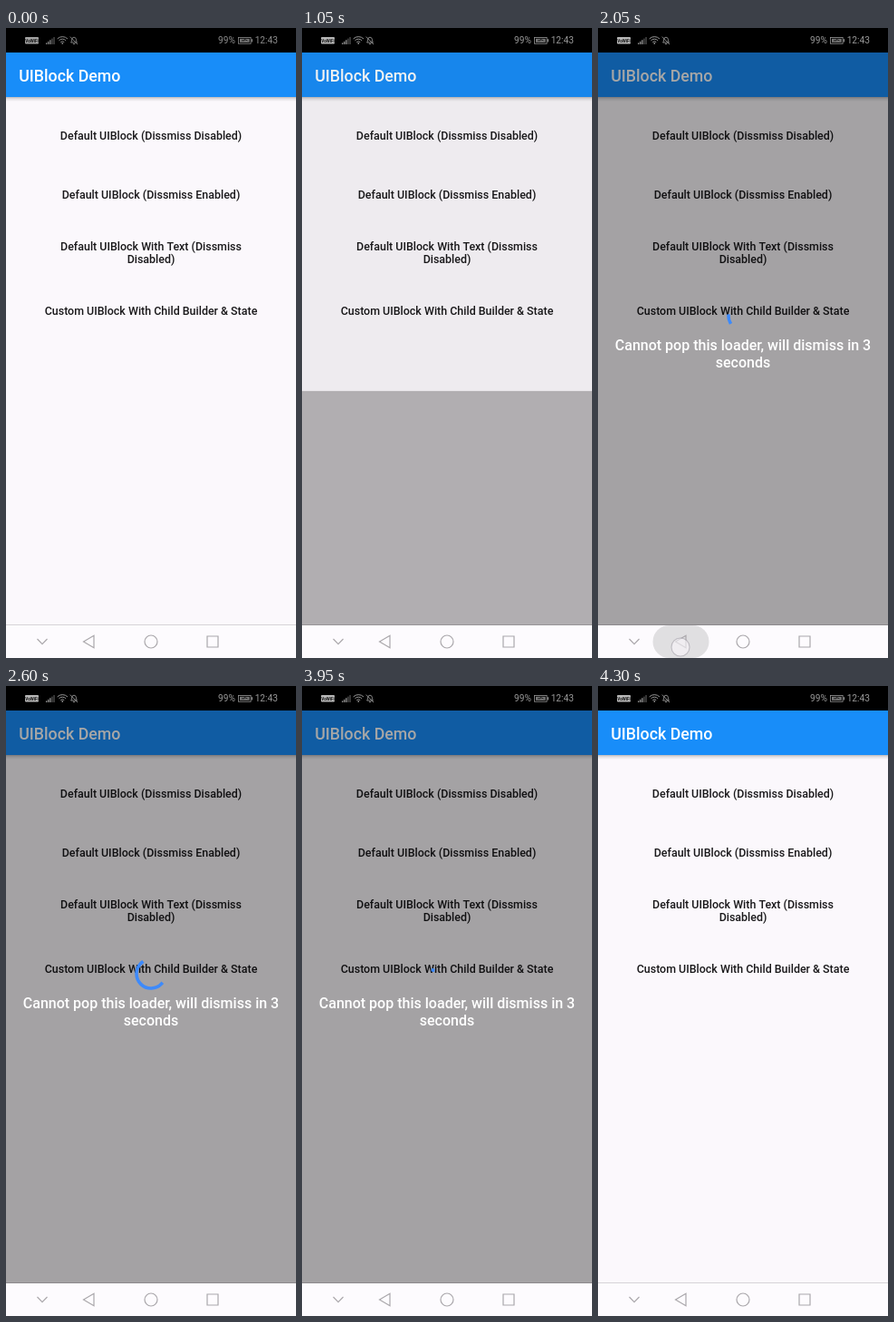
Recreate the animation shown at these times as an HTML page with a canvas. Size 320x694 px, loop 4.8 s.

```html
<!DOCTYPE html>
<html lang="en">
<head>
<meta charset="utf-8">
<title>UIBlock Demo</title>
<style>
  html, body { margin: 0; width: 100%; height: 100%; overflow: hidden; background: #fbf8fc; }
  canvas { display: block; width: 320px; height: 694px; }
</style>
</head>
<body>
<canvas id="stage"></canvas>
<script>
const W = 320, H = 694, LOOP = 4800, STEP = 50;
const TOP = 27, BAR = 76, NAV = 658;
const FONT = 'Roboto, "Noto Sans", sans-serif';
const canvas = document.getElementById('stage');
const g = canvas.getContext('2d');
const dpr = window.devicePixelRatio || 1;
canvas.width = W * dpr;
canvas.height = H * dpr;

const clamp = v => Math.max(0, Math.min(1, v));
const ramp = (t, from, to) => clamp((t - from) / (to - from));

function rect(x, y, w, h, color) {
  g.fillStyle = color;
  g.fillRect(x, y, w, h);
}

function text(str, x, y, size, color, align = 'center', weight = 500) {
  g.font = `${weight} ${size}px ${FONT}`;
  g.textAlign = align;
  g.fillStyle = color;
  g.fillText(str, x, y);
}

function line(points, color, width, closed) {
  g.beginPath();
  points.forEach(([x, y]) => g.lineTo(x, y));
  if (closed) g.closePath();
  g.strokeStyle = color;
  g.lineWidth = width;
  g.stroke();
}

function arc(x, y, r, from, to, color, width) {
  g.beginPath();
  g.arc(x, y, r, from, to);
  g.strokeStyle = color;
  g.lineWidth = width;
  g.stroke();
}

// Material standard curve: cubic-bezier(.4, 0, .2, 1)
function fastOutSlowIn(x) {
  let lo = 0, hi = 1;
  for (let i = 0; i < 24; i++) {
    const s = (lo + hi) / 2, q = 1 - s;
    if (1.2 * q * q * s + 0.6 * q * s * s + s * s * s < x) lo = s; else hi = s;
  }
  return lo * lo * (3 - 2 * lo);
}

function statusBar(t) {
  rect(0, 0, W, TOP, '#000');
  const ink = t < STEP ? '#8c8c8c' : '#989898';
  g.fillStyle = t < STEP ? '#a4a4a4' : '#b8b8b8';
  g.beginPath();
  g.roundRect(21, 10, 15, 7.5, 1);
  g.fill();
  text('VoWiFi', 28.5, 15.8, 4.6, '#111', 'center', 700);

  for (let i = 0; i < 5; i++) {
    rect(44 + i * 2.1, 16.4 - i * 1.6, 1.3, 1.6 + i * 1.6, i < 3 ? ink : '#505050');
  }
  [2.8, 5.4, 8].forEach(r => arc(62.3, 17.6, r, -Math.PI * 0.75, -Math.PI * 0.25, ink, 1));
  g.beginPath();
  g.arc(62.3, 16.9, 0.9, 0, 7);
  g.fillStyle = ink;
  g.fill();

  line([[71.5, 16], [72.6, 14.8], [72.6, 12.4], [73.4, 10.8], [75, 10.2],
        [76.6, 10.8], [77.4, 12.4], [77.4, 14.8], [78.5, 16]], ink, 0.9, true);
  line([[74, 17.6], [76, 17.6]], ink, 0.9);
  line([[70.8, 9.6], [79, 18]], ink, 0.9);

  text('99%', 234, 17.4, 10.2, ink, 'left', 400);
  text('12:43', 300, 17.4, 10.2, ink, 'right', 400);
  g.strokeStyle = ink;
  g.lineWidth = 0.8;
  g.strokeRect(256.5, 10.4, 13.6, 6.8);
  rect(258, 11.8, 10.6, 4, '#777');
  rect(270.8, 12.2, 1.2, 3.2, ink);
  line([[260, 13.8], [263, 13.8], [263, 12.6], [266.5, 13.8]], '#111', 0.9);
}

function page() {
  rect(0, TOP, W, NAV - TOP, '#fbf8fc');
  const shade = g.createLinearGradient(0, BAR, 0, BAR + 5);
  shade.addColorStop(0, 'rgba(0,0,0,.26)');
  shade.addColorStop(0.4, 'rgba(0,0,0,.1)');
  shade.addColorStop(1, 'rgba(0,0,0,0)');
  rect(0, BAR, W, 5, shade);
  rect(0, TOP, W, BAR - TOP, '#188df9');
  text('UIBlock Demo', 14.2, 58.7, 17.78, '#fff', 'left');

  const label = (str, y) => text(str, 160, y, 12.44, '#19181a');
  label('Default UIBlock (Dissmiss Disabled)', 123.4);
  label('Default UIBlock (Dissmiss Enabled)', 187.6);
  label('Default UIBlock With Text (Dissmiss', 244.5);
  label('Disabled)', 258.8);
  label('Custom UIBlock With Child Builder & State', 315.8);
  rect(0, NAV - 1, W, 1, '#d6d3d7');
}

function spinner(x, y, ms) {
  const cycle = 1333, turn = Math.PI * 2;
  const phase = ms % cycle / cycle;
  const head = fastOutSlowIn(clamp(phase * 2)) * 0.75;
  const tail = fastOutSlowIn(clamp(phase * 2 - 1)) * 0.75;
  const start = (-0.25 + tail + ms / 2222 + phase * 0.25) * turn;
  g.lineCap = 'square';
  arc(x, y, 16, start, start + Math.max((head - tail) * turn, 0.001), '#3d8afb', 3.56);
  g.lineCap = 'butt';
}

function loader(t) {
  const shown = Math.min(ramp(t, 960, 1180), 1 - ramp(t, 4000, 4220));
  if (!shown) return;
  const drop = (1 - shown) * (NAV - TOP);
  g.save();
  g.beginPath();
  g.rect(0, TOP, W, NAV - TOP);
  g.clip();
  rect(0, TOP, W, NAV - TOP, `rgba(0,0,0,${0.12 * shown})`);
  g.translate(0, drop);
  rect(0, TOP, W, NAV - TOP, 'rgba(0,0,0,.26)');
  spinner(160, 317, Math.max(0, (t - 962) * 4 / 3));
  text('Cannot pop this loader, will dismiss in 3', 160, 355, 16, '#fff');
  text('seconds', 160, 373.8, 16, '#fff');
  g.restore();
}

function navBar(t) {
  rect(0, NAV, W, H - NAV, '#fdfbfe');
  const press = Math.min(ramp(t, 1850, 1950), 1 - ramp(t, 2100, 2350));
  if (press) {
    g.fillStyle = `rgba(0,0,0,${0.115 * press})`;
    g.beginPath();
    g.roundRect(60.5, NAV, 62, 36, 18);
    g.fill();
  }
  const ink = '#aaa7ab';
  line([[34.5, 673], [40, 678.6], [45.5, 673]], ink, 1.2);
  line([[85.5, 676], [97, 669.2], [97, 682.8]], ink, 1.2, true);
  arc(160, 676, 7, 0, 7, ink, 1.2);
  line([[222, 670], [234, 670], [234, 682], [222, 682]], ink, 1.2, true);
}

function touch(x, y) {
  g.beginPath();
  g.arc(x, y, 10, 0, 7);
  g.fillStyle = 'rgba(250,247,252,.6)';
  g.fill();
  arc(x, y, 10, 0, 7, 'rgba(150,145,155,.5)', 1.1);
}

function draw(t) {
  g.setTransform(dpr, 0, 0, dpr, 0, 0);
  page();
  loader(t);
  statusBar(t);
  navBar(t);
  if (t >= 850 && t < 950) touch(220, 240);
  if (t >= 1900 && t < 2100) touch(91, 682);
}

const began = performance.now();
function tick() {
  const t = (performance.now() - began) % LOOP;
  draw(Math.floor(t / STEP) * STEP);
  requestAnimationFrame(tick);
}
tick();
</script>
</body>
</html>
```
